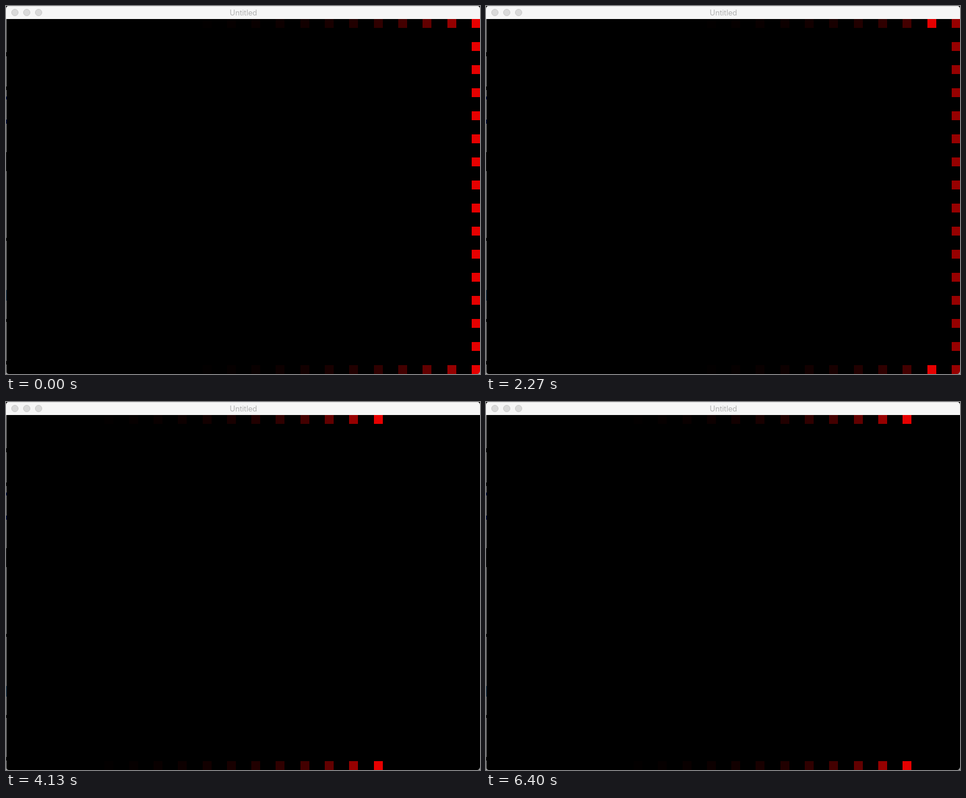
An HTML page with a canvas that plays this animation: 800x622 px, repeating every 6.47 s.

```html
<!DOCTYPE html>
<html lang="en">
<head>
<meta charset="utf-8">
<title>Untitled</title>
<style>
  html, body { margin: 0; width: 100%; height: 100%; overflow: hidden; background: #000; }
  svg, canvas { position: absolute; left: 0; top: 0; display: block; }
  text { font: 12.6px Inter, Roboto, sans-serif; fill: #b1b1b1; text-anchor: middle; }
</style>
</head>
<body>
<canvas id="lights" width="800" height="622"></canvas>
<svg width="800" height="622" viewBox="0 0 800 622">
  <!-- sliver of desktop beside the window -->
  <path d="M.5 22V622" stroke="#8c8c8c"/>
  <path d="M.5 78v7M.5 136v6M.5 247v32M.5 392v5M.5 529v5M.5 600v6" stroke="#1c1c1c"/>
  <path d="M.5 153v5M.5 192v7" stroke="#10205c"/>
  <path d="M.5 480v18" stroke="#31506a"/>
  <path d="M0 617v5h5q-4 0-5-5zM800 617v5h-5q4 0 5-5z" fill="#a8a8a8"/>
  <!-- title bar -->
  <path d="M0 22V5q0-5 5-5h790q5 0 5 5v17z" fill="#f6f6f6"/>
  <path d="M4 .5h792" stroke="#dedede"/>
  <g fill="#d9d9d9" stroke="#c9c9c9">
    <circle cx="15" cy="11" r="5.5"/>
    <circle cx="35" cy="11" r="5.5"/>
    <circle cx="55" cy="11" r="5.5"/>
  </g>
  <text x="400.7" y="16">Untitled</text>
</svg>
<script>
const LOOP = 6470, TICKS = 97, LAST = 19, ROWS = 16, SIZE = 15;
const GLOW = [230, 150, 98, 67, 47, 33, 24, 18, 13, 9, 6, 3];
// [tick, columns travelled]: the sweep runs slightly unevenly
const PACE = [[0, 0], [9, 10], [25, 29], [30, 35], [42, 49], [53, 61],
              [60, 70], [71, 82], [80, 94], [90, 105], [96, 112]];
const ctx = document.getElementById('lights').getContext('2d');

function travelled(tick) {
  const i = Math.max(1, PACE.findIndex(p => p[0] >= tick));
  const [t0, d0] = PACE[i - 1], [t1, d1] = PACE[i];
  return Math.floor(d0 + (d1 - d0) * (tick - t0) / (t1 - t0) + 1e-6);
}

// bounce between the right and left edges, starting at the right
function column(steps) {
  const period = 2 * LAST;
  const s = ((steps % period) + period) % period;
  return Math.abs(LAST - s);
}

function tickAt(time) {
  let n = Math.min(TICKS - 1, Math.floor(time * 3 / 200) + 1);
  while (n > 0 && Math.round(n * 20 / 3) * 10 > time) n--;
  return n;
}

function draw(tick) {
  const head = travelled(tick);
  ctx.fillStyle = '#000';
  ctx.fillRect(0, 0, 800, 622);
  // oldest first, so the newest visit to a column wins
  for (let age = GLOW.length - 1; age >= 0; age--) {
    const col = column(head - age);
    const x = Math.round(1 + col * 785 / LAST);
    const atEdge = col === 0 || col === LAST;
    ctx.fillStyle = `rgb(${GLOW[age]},0,0)`;
    for (let row = 0; row < ROWS; row += atEdge ? 1 : ROWS - 1) {
      ctx.fillRect(x, 22 + row * 39, SIZE, SIZE);
    }
  }
}

const start = performance.now();
let shown = -1;
function loop() {
  const tick = tickAt((performance.now() - start) % LOOP);
  if (tick !== shown) draw(shown = tick);
  requestAnimationFrame(loop);
}
loop();
</script>
</body>
</html>
```
